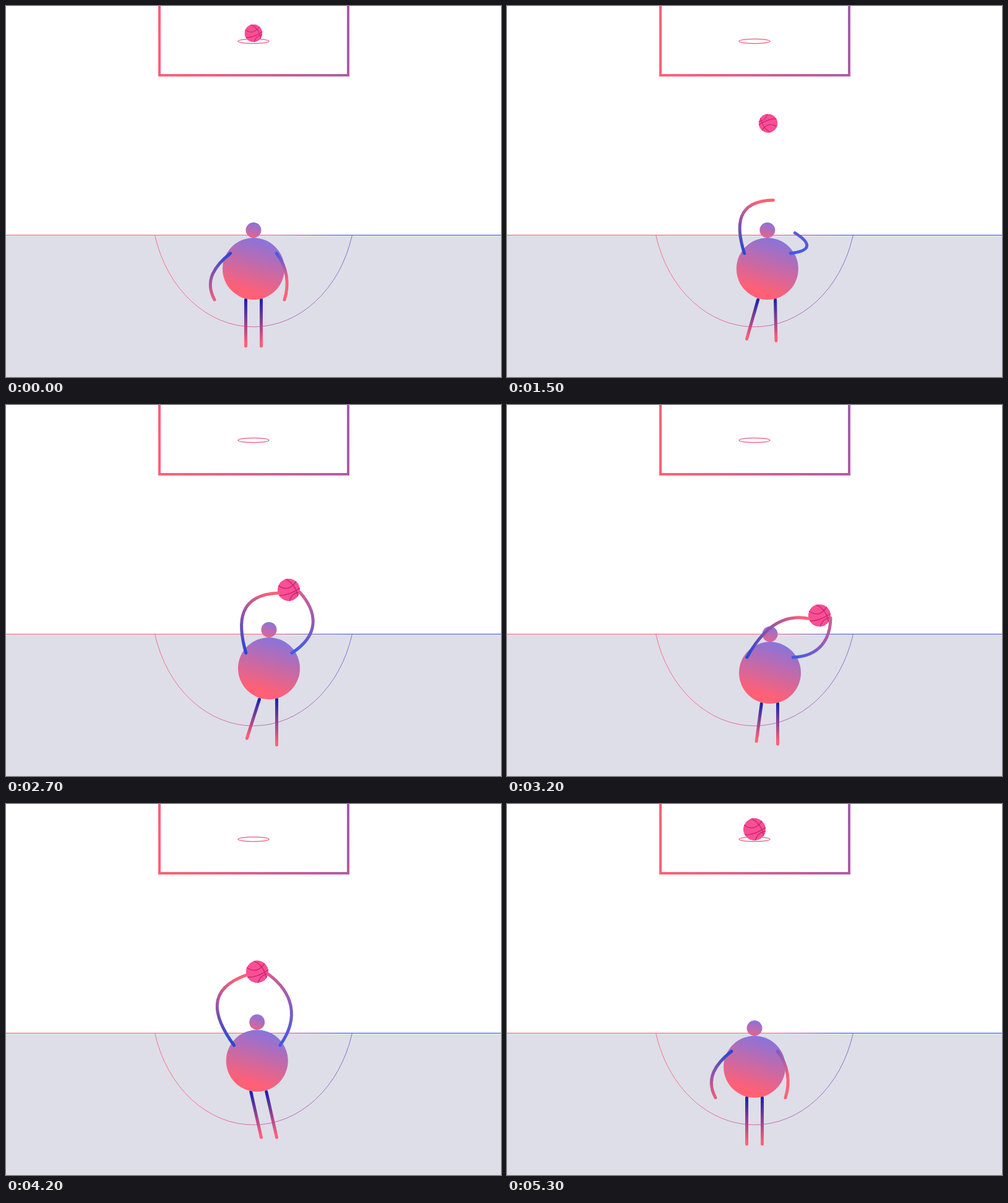
An HTML page for the animation above (5800 ms loop, 800 by 600 pixels).

```html
<!DOCTYPE html>
<html lang="en">
<head>
<meta charset="utf-8">
<title>Free throw</title>
<style>
html, body { margin: 0; width: 100%; height: 100%; overflow: hidden; background: #fff; }
svg { display: block; width: 100%; height: 100%; }
</style>
</head>
<body>
<svg viewBox="0 0 800 600">
  <defs>
    <linearGradient id="board" gradientUnits="userSpaceOnUse" x1="248" y1="60" x2="848" y2="-190">
      <stop stop-color="#ff6076"/><stop offset="1" stop-color="#3a57e8"/>
    </linearGradient>
    <linearGradient id="horizon" gradientUnits="userSpaceOnUse" x1="420" y1="0" x2="540" y2="0">
      <stop stop-color="#ff6076"/><stop offset="1" stop-color="#3a57e8"/>
    </linearGradient>
    <linearGradient id="arc" gradientUnits="userSpaceOnUse" x1="300" y1="0" x2="620" y2="0">
      <stop stop-color="#ff6076"/><stop offset="1" stop-color="#5a62e0"/>
    </linearGradient>
    <linearGradient id="skin" x1=".64" y1="0" x2=".38" y2=".86">
      <stop stop-color="#8674de"/><stop offset="1" stop-color="#ff6076"/>
    </linearGradient>
    <linearGradient id="face" x1=".6" y1="0" x2=".36" y2="1.15">
      <stop stop-color="#8674de"/><stop offset="1" stop-color="#f56080"/>
    </linearGradient>
    <clipPath id="round"><circle r="18"/></clipPath>
  </defs>
  <rect width="800" height="600" fill="#fff"/>
  <rect y="371" width="800" height="229" fill="#dedee8"/>
  <rect y="370" width="800" height="1" fill="url(#horizon)"/>
  <path d="M240.7 371A165 200 0 0 0 559.3 371" fill="none" stroke="url(#arc)" stroke-width=".9"/>
  <path d="M248 -10V112H553V-10" fill="none" stroke="url(#board)" stroke-width="4"/>
  <ellipse cx="400" cy="57" rx="25" ry="3.7" fill="none" stroke="#f2557c" stroke-width="1.2"/>
  <g id="ball" clip-path="url(#round)">
    <circle r="18" fill="#f94f94"/>
    <path d="M-17 -7Q0 5 12 -14M-17 9Q2 9 19 -4M-7 -18Q11 -11 15 12M1 19Q4 5 18 3"
      fill="none" stroke="#c9216f" stroke-width="1.3"/>
  </g>
  <g id="man" fill="none" stroke-width="5" stroke-linecap="round" stroke-linejoin="round"></g>
</svg>
<script>
const LOOP = 5800, STEP = 100, LAST = 5300;
const CATCH = 1850, SHOOT = 4490;
const NS = 'http://www.w3.org/2000/svg';
const man = document.getElementById('man');
const ballNode = document.getElementById('ball');

function set(node, attrs) {
  for (const key in attrs) node.setAttribute(key, attrs[key]);
}

function add(parent, tag, attrs) {
  const node = document.createElementNS(NS, tag);
  set(node, attrs);
  return parent.appendChild(node);
}

const part = (t, a, b) => Math.min(1, Math.max(0, (t - a) / (b - a)));
const mix = (a, b, u) => a + (b - a) * u;

// Eased step from 0 to 1, and an eased rise and fall
function ease(t, a, b) {
  const u = part(t, a, b);
  return u * u * (3 - 2 * u);
}
const bump = (t, a, b) => Math.sin(Math.PI * part(t, a, b)) ** 2;

// Hand x, y from the body centre, bend of the arm, reach of its gradient
const rest = { left: [-63, 50, 23, 1.1], right: [50, 50, 13, .6] };
const toss = { left: [9.5, -111, 49, .85], right: [44.5, -58, 32, 6] };
const follow = { left: [-61, -108, 30, 1.35], right: [50, -93, 30, .95] };

function bodyAt(t) {
  return [
    400 + 25 * ease(t, 500, 1850) - 25 * ease(t, 3200, 4650),
    425 + 13 * ease(t, 2500, 3700) - 26 * ease(t, 3850, 4300) + 13 * ease(t, 4750, LAST)
  ];
}

function heldBall(t) {
  const [x, y] = bodyAt(t), sway = bump(t, 2700, 3700);
  return [
    x + 32 - 41 * ease(t, 3300, 4600) + 48 * sway,
    y - 127 - 17 * ease(t, 3000, 4000) + 36 * sway
  ];
}

function ballAt(t) {
  if (t < 1250) return [400 - t * .008, Math.min(440, 44 + 322 * (t / 700) ** 2)];
  if (t < CATCH) return [422 + (t - 1500) * .09, 151 + 28.8 * ((t - 1616) / 100) ** 2];
  const [x, y] = heldBall(Math.min(t, SHOOT));
  const u = ease(t, SHOOT, LAST);
  return [mix(x, 400, u), mix(y, 41, u)];
}

function feetAt(t) {
  const lift = 9 * ease(t, 3850, 4300) - 12 * ease(t, 4800, LAST);
  const back = 25 * ease(t, 4600, LAST);
  const squat = ease(t, 2500, 3700);
  return {
    left: [387.5 + 25 * squat - back, 550 - 11.5 * ease(t, 700, 1500) + 8.5 * squat - lift],
    right: [412.5 + 25 * ease(t, 300, 1800) - back, 550 - 9 * bump(t, 400, 2300) - 3 * squat - lift]
  };
}

function handAt(t, side) {
  const [x, y] = bodyAt(t), [bx, by] = heldBall(t);
  const grip = side === 'left'
    ? [bx - x - 17, by - y + 5, 52, .95]
    : [bx - x + 18, by - y + 4, 37, 1.3];
  const raise = ease(t, 600, 1300), hold = ease(t, 1500, 1900);
  const release = ease(t, 4250, 4600), drop = ease(t, 4600, LAST);
  const hand = grip.map((g, i) => {
    const up = mix(mix(rest[side][i], toss[side][i], raise), g, hold);
    return mix(mix(up, follow[side][i], release), rest[side][i], drop);
  });
  if (side === 'left') hand[0] -= 30 * bump(t, 700, 1300) + 50 * bump(t, 4600, LAST);
  return hand;
}

function limb(id, color) {
  const grad = add(man, 'linearGradient', { id, gradientUnits: 'userSpaceOnUse' });
  add(grad, 'stop', { 'stop-color': color });
  add(grad, 'stop', { offset: 1, 'stop-color': '#ff6076' });
  const path = add(man, 'path', { stroke: `url(#${id})` });
  return (d, x1, y1, x2, y2) => {
    set(path, { d });
    set(grad, { x1, y1, x2, y2 });
  };
}

const legs = { left: limb('legL', '#1a22b0'), right: limb('legR', '#1a22b0') };
const torso = add(man, 'circle', { r: 50, fill: 'url(#skin)' });
const head = add(man, 'circle', { r: 12.5, fill: 'url(#face)' });
const arms = { left: limb('armL', '#2446d8'), right: limb('armR', '#3f5ae6') };

function poseLeg(draw, hipX, hipY, [x, y]) {
  const top = mix(hipX, x, .13);
  draw(`M${top} ${hipY}L${x} ${y}`, top, hipY, x + .01, y - 4);
}

// The elbow always bulges outward; skew moves the bulge toward the hand.
function poseArm(draw, x, y, side, [hx, hy, bend, reach], back) {
  const out = side === 'left' ? -1 : 1;
  const skew = side === 'left' ? .2 : -.08;
  const sx = 37.2 * out, sy = -25;
  const dx = hx - sx, dy = hy - sy, k = out * bend * dy / (dx * dx + dy * dy);
  const at = (u, f) => `${x + sx + dx * u + dy * k * f} ${y + sy + dy * u - dx * k * f}`;
  draw(`M${at(0, 0)}C${at(.34, 1 - skew)} ${at(.7, 1 + skew)} ${at(1, 0)}`,
    x + sx - dx * reach * back, y + sy - dy * reach * back,
    x + sx + dx * reach, y + sy + dy * reach);
}

function render(t) {
  const [x, y] = bodyAt(t), feet = feetAt(t);
  set(torso, { cx: x, cy: y });
  set(head, { cx: x, cy: y - 62.5 });
  poseLeg(legs.left, x - 12.5, y + 50, feet.left);
  poseLeg(legs.right, x + 12.5, y + 50, feet.right);
  poseArm(arms.left, x, y, 'left', handAt(t, 'left'), 0);
  poseArm(arms.right, x, y, 'right', handAt(t, 'right'), .5 * ease(t, 4300, LAST));

  const [bx, by] = ballAt(t);
  const size = 14.5 + 3.7 * ease(t, 1300, 1950);
  const turn = 180 * (ease(t, 0, 1500) + ease(t, 1500, 2000))
    + 45 * ease(t, 4300, 4600) + 315 * ease(t, 4600, LAST);
  set(ballNode, { transform: `translate(${bx} ${by}) rotate(${turn}) scale(${size / 18})` });
}

const start = performance.now();
function tick() {
  const t = (performance.now() - start) % LOOP;
  render(Math.min(LAST, Math.floor(t / STEP) * STEP));
  requestAnimationFrame(tick);
}
tick();
</script>
</body>
</html>
```
